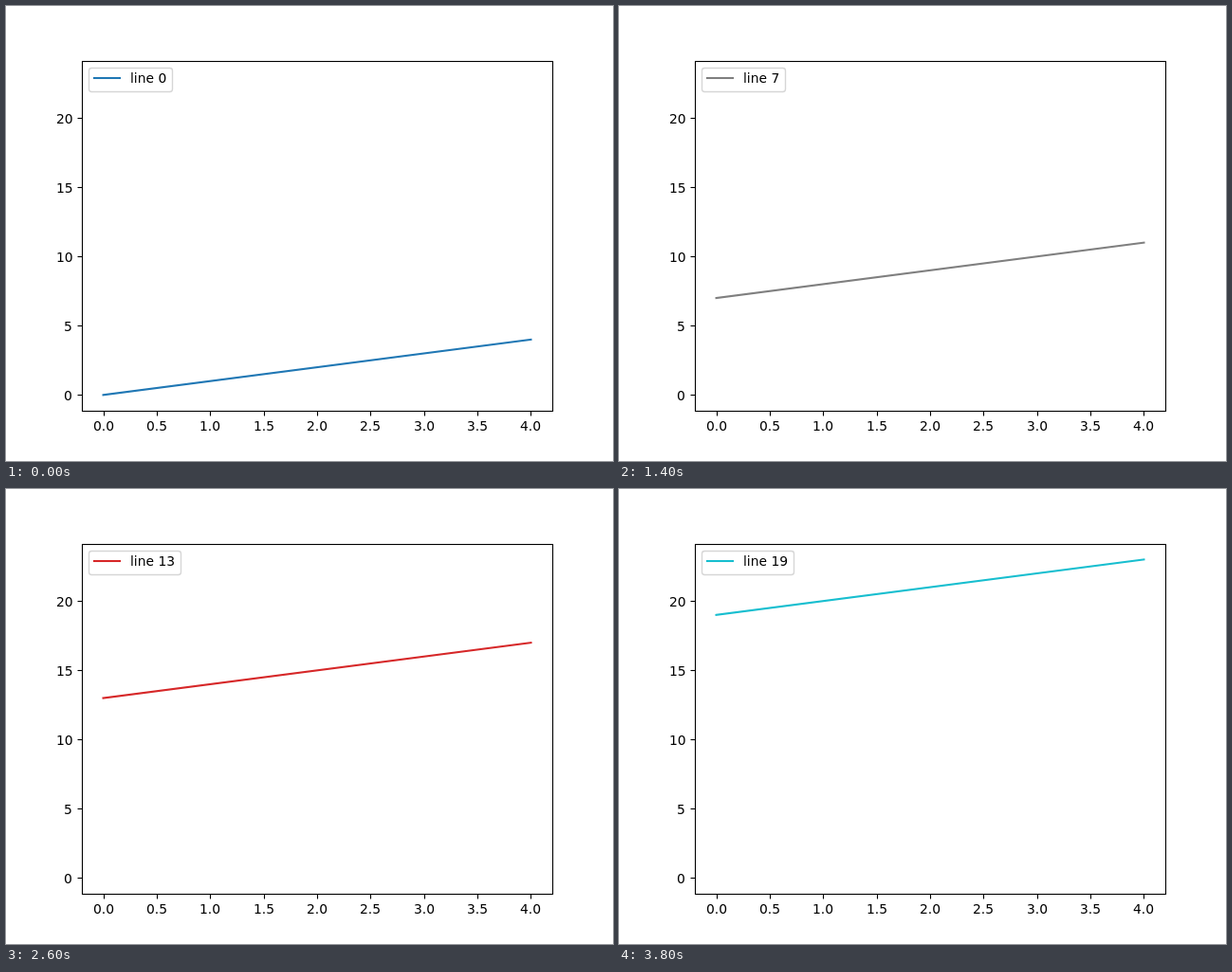
These frames come from a looping animation (640x480 px, 4 s). An HTML page with a canvas:

```html
<!DOCTYPE html>
<html lang="en">
<head>
<meta charset="utf-8">
<title>Rising lines</title>
<style>
  html, body { margin: 0; width: 100%; height: 100%; overflow: hidden; background: #fff; }
  canvas { display: block; }
</style>
</head>
<body>
<canvas id="stage" width="640" height="480"></canvas>
<script>
const ctx = document.getElementById('stage').getContext('2d');
const STEP = 200, COUNT = 20;
const COLORS = ['#1f77b4', '#ff7f0e', '#2ca02c', '#d62728', '#9467bd',
                '#8c564b', '#e377c2', '#7f7f7f', '#bcbd22', '#17becf'];
const PT = 100 / 72;
const FONT = 10 * PT;
const BOX = { left: 80, right: 576, top: 57.6, bottom: 427.2 };

const px = v => BOX.left + (v + 0.2) / 4.4 * (BOX.right - BOX.left);
const py = v => BOX.bottom - (v + 1.15) / 25.3 * (BOX.bottom - BOX.top);
const snap = v => Math.round(v) + 0.5;

function segment(x1, y1, x2, y2, color, width, cap = 'butt') {
  ctx.strokeStyle = color;
  ctx.lineWidth = width;
  ctx.lineCap = cap;
  ctx.beginPath();
  ctx.moveTo(x1, y1);
  ctx.lineTo(x2, y2);
  ctx.stroke();
}

// align: 0 = left, 0.5 = centre, 1 = right
function label(text, x, baseline, align) {
  ctx.fillStyle = '#000';
  ctx.fillText(text, Math.round(x - ctx.measureText(text).width * align), baseline);
}

function drawAxes() {
  const thin = 0.8 * PT;
  const bottom = snap(BOX.bottom), left = snap(BOX.left);
  for (let v = 0; v <= 4; v += 0.5) {
    const x = snap(px(v));
    segment(x, bottom, x, bottom + 5, '#000', thin);
    label(v.toFixed(1), px(v), 448, 0.5);
  }
  for (let v = 0; v <= 20; v += 5) {
    const y = snap(py(v));
    segment(left, y, left - 5, y, '#000', thin);
    label(String(v), BOX.left - 7 * PT, Math.round(py(v)) + 6, 1);
  }
  ctx.lineWidth = thin;
  ctx.strokeStyle = '#000';
  ctx.strokeRect(left, snap(BOX.top), snap(BOX.right) - left, bottom - snap(BOX.top));
}

function drawLegend(n, color) {
  const right = n < 10 ? 175.5 : 184.5;
  ctx.beginPath();
  ctx.roundRect(87.5, 65.5, right - 87.5, 25, 2.8);
  ctx.fillStyle = 'rgba(255,255,255,0.8)';
  ctx.fill();
  ctx.strokeStyle = 'rgba(204,204,204,0.8)';
  ctx.lineWidth = PT;
  ctx.stroke();
  segment(93, 76, 120, 76, color, 1.5 * PT, 'square');
  label('line ' + n, 131, 81, 0);
}

function draw(n) {
  const color = COLORS[n % COLORS.length];
  ctx.fillStyle = '#fff';
  ctx.fillRect(0, 0, 640, 480);
  ctx.font = FONT + 'px "DejaVu Sans", sans-serif';
  segment(px(0), py(n), px(4), py(n + 4), color, 1.5 * PT, 'square');
  drawAxes();
  drawLegend(n, color);
}

const start = performance.now();
function tick() {
  const time = performance.now() - start;
  draw(Math.floor(time / STEP) % COUNT);
  requestAnimationFrame(tick);
}
tick();
</script>
</body>
</html>
```
